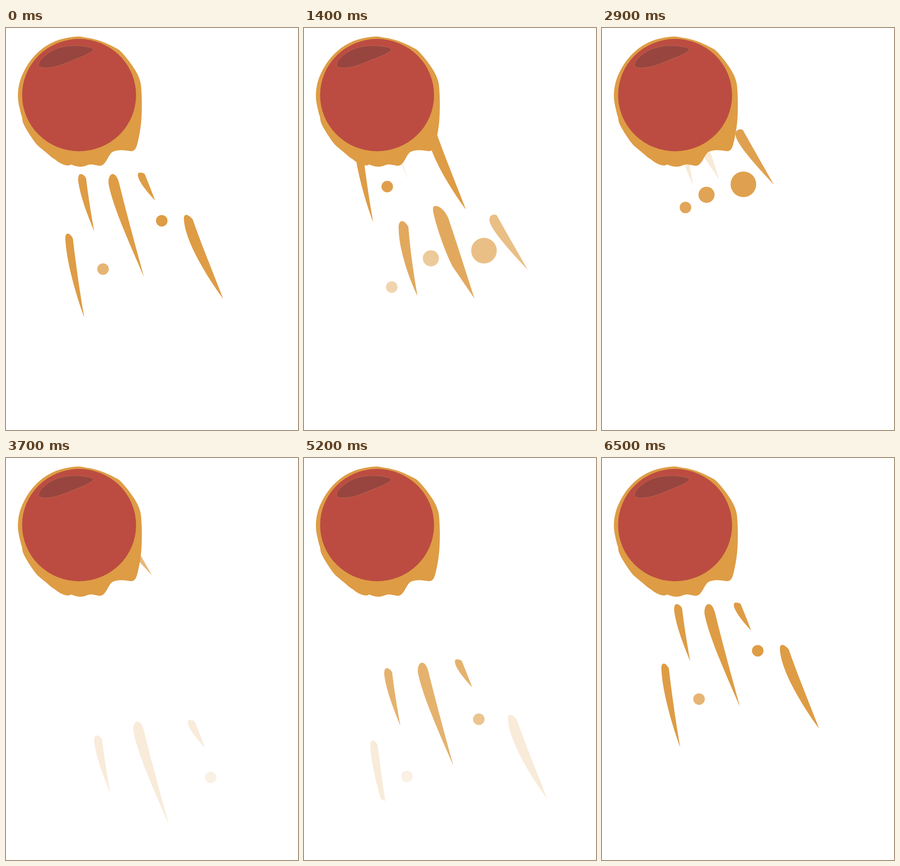
Recreate the animation shown at these times as an HTML page. Size 638 px wide and 878 px high, loop 6.6 s.

```html
<!DOCTYPE html>
<html lang="en">
<head>
<meta charset="utf-8">
<title>Falling ball</title>
<style>
  html, body { margin: 0; width: 100%; height: 100%; overflow: hidden; background: #fff; }
  svg { display: block; width: 100vw; height: 100vh; }
</style>
</head>
<body>
<svg viewBox="0 0 638 878" fill="#de9c45">
  <clipPath id="cut"><path d="M0 0H638V933L0 678Z"/></clipPath>
  <g id="trail"></g>
  <path d="M158 18.5C168 19 170 21 182 22C190 23 192 25 199 26C215 31 228 37 246 47C254 54 260 61 267 70C279 86 295 107 295.5 132C297 150 297 170 296.5 185C296 210 292 233 287 253C284 264 281 269 273 269C262 267 246 265 234 270C222 276 220 301 204 301C196 300 192 298 184 298C176 299 172 303 163 303C154 303 148 300 142 298C140 300 137 300.5 133 300C124 299 114 293 107 287C98 282 92 275 84 269C76 262 71 259 66 253C60 246 56 239 51 232C46 223 40 215 37 206C35 200 36 195 33 189C30 175 26 163 26 148C26 128 31 110 40 93C50 74 62 58 82 43C104 27 130 20 158 18.5Z"/>
  <ellipse cx="159.7" cy="146.5" rx="124.5" ry="122.7" fill="#bc4c41"/>
  <path d="M71 80C72 70 90 54 106 47C126 38 155 36 182 42C192 45 193 48 186 52C176 59 160 65 144 71C126 79 106 87 87 87C76 87 71 85 71 80Z" fill="#984540" stroke="#b9704e" stroke-width=".8"/>
</svg>
<script>
const CYCLE = 6500, LOOP = 6600, STEP = 100, SEG = CYCLE / 4;
const trail = document.getElementById('trail');
const pieces = [];

function make(tag, attrs, parent) {
  const el = document.createElementNS('http://www.w3.org/2000/svg', tag);
  for (const k in attrs) el.setAttribute(k, attrs[k]);
  return parent.appendChild(el);
}

// Each key is [dx, dy, opacity]; keys are one SEG apart, beginning at start.
function streak(start, d, keys, clip) {
  const parent = clip ? make('g', { 'clip-path': clip }, trail) : trail;
  pieces.push({ el: make('path', { d }, parent), start, keys });
}
function dot(start, cx, cy, r, keys) {
  pieces.push({ el: make('circle', { cx, cy, r }, trail), start, keys });
}

// First wave
streak(0, 'M213 422C219 421 224 428 228 434C232 485 239 535 248 585.5C228 545 207 480 207 440C206 430 208 423 213 422Z',
  [[56, 186, 0], [-9, -30, 1], [-60, -301, 0]]);
streak(0, 'M287 389C297 389 309 401 315 415C334 470 353 532 372.5 591.5L325 522C311 497 287 430 282 400C281 393 283 389 287 389Z',
  [[75, 159, 0], [-12, -26, 1], [-145, -325, 0]]);
streak(0, 'M412 408C415 407 418 407 421 408.5C443 448 466 488 489 528.5C465 502 408 443 405 420C405 413 407 409 412 408Z',
  [[100, 138, 0], [-16, -22, .75], [-140, -231, 1], [-248, -379, 0]]);
dot(0, 393, 486, 28, [[95, 145, 0], [-15, -23, .75], [-103, -178, 1], [-247, -442, 0]]);
dot(0, 277, 503, 17.6, [[70, 131, 0], [-11, -21, .62], [-59, -171, 1], [-124, -395, 0]]);
dot(0, 192, 566, 12.6, [[4, 130, 0], [-1, -21, .5], [-12, -216, 1], [-48, -451, 0]]);

// Second wave
streak(2 * SEG, 'M163 319C168 319 172 323 175 328C178 355 184 395 193 445C178 408 163 370 158 336C157 328 158 319 163 319Z',
  [[40, 330, 0], [22, 175, .72], [0, 0, 1], [-35, -233, 0]]);
streak(2 * SEG, 'M233 319C240 319 244 328 247 338C262 400 284 480 301.5 544C274 480 233 390 224 340C223 329 227 319 233 319Z',
  [[63, 293, 0], [31, 160, .72], [0, 0, 1], [-87, -248, 0]]);
streak(2 * SEG, 'M295 316C298 316 301 317 303 319C311 338 318 356 326 377C312 362 289 336 288 321C288 316 291 315 295 316Z',
  [[131, 295, 0], [52, 155, .72], [0, 0, 1], [-127, -227, 0]]);
dot(2 * SEG, 340.3, 421, 12.6, [[128, 311, 0], [52, 187, .5], [0, 0, 1], [-125, -214, 0]]);

// Third wave
streak(3 * SEG, 'M135 449C139 449 143 454 146 459C152 510 160 570 171 632C155 590 133 515 130 466C129 456 130 449 135 449Z',
  [[19, 210, 0], [0, 0, 1], [-23, -241, 1], [-23, -374, 0]], 'url(#cut)');
streak(3 * SEG, 'M394 408C399 409 404 413 408 418C426 470 452 533 474.5 591.5C440 545 394 470 389 422C388 414 389 408 394 408Z',
  [[71, 191, 0], [0, 0, 1], [-140, -226, 1], [-216, -359, 0]]);
dot(3 * SEG, 212, 526.5, 12.6, [[16, 211, 0], [0, 0, .75], [-35, -209, 1], [-45, -320, 0]]);

function draw(time) {
  for (const { el, start, keys } of pieces) {
    const pos = ((time - start + CYCLE) % CYCLE) / SEG;
    const i = Math.floor(pos);
    if (i >= keys.length - 1) {
      el.setAttribute('opacity', 0);
      continue;
    }
    const [x, y, alpha] = keys[i].map((v, k) => v + (keys[i + 1][k] - v) * (pos - i));
    el.setAttribute('transform', `translate(${x} ${y})`);
    el.setAttribute('opacity', alpha);
  }
}

const begin = performance.now();
function tick() {
  const t = (performance.now() - begin) % LOOP;
  draw(Math.floor(t / STEP) * STEP);
  requestAnimationFrame(tick);
}
tick();
</script>
</body>
</html>
```
